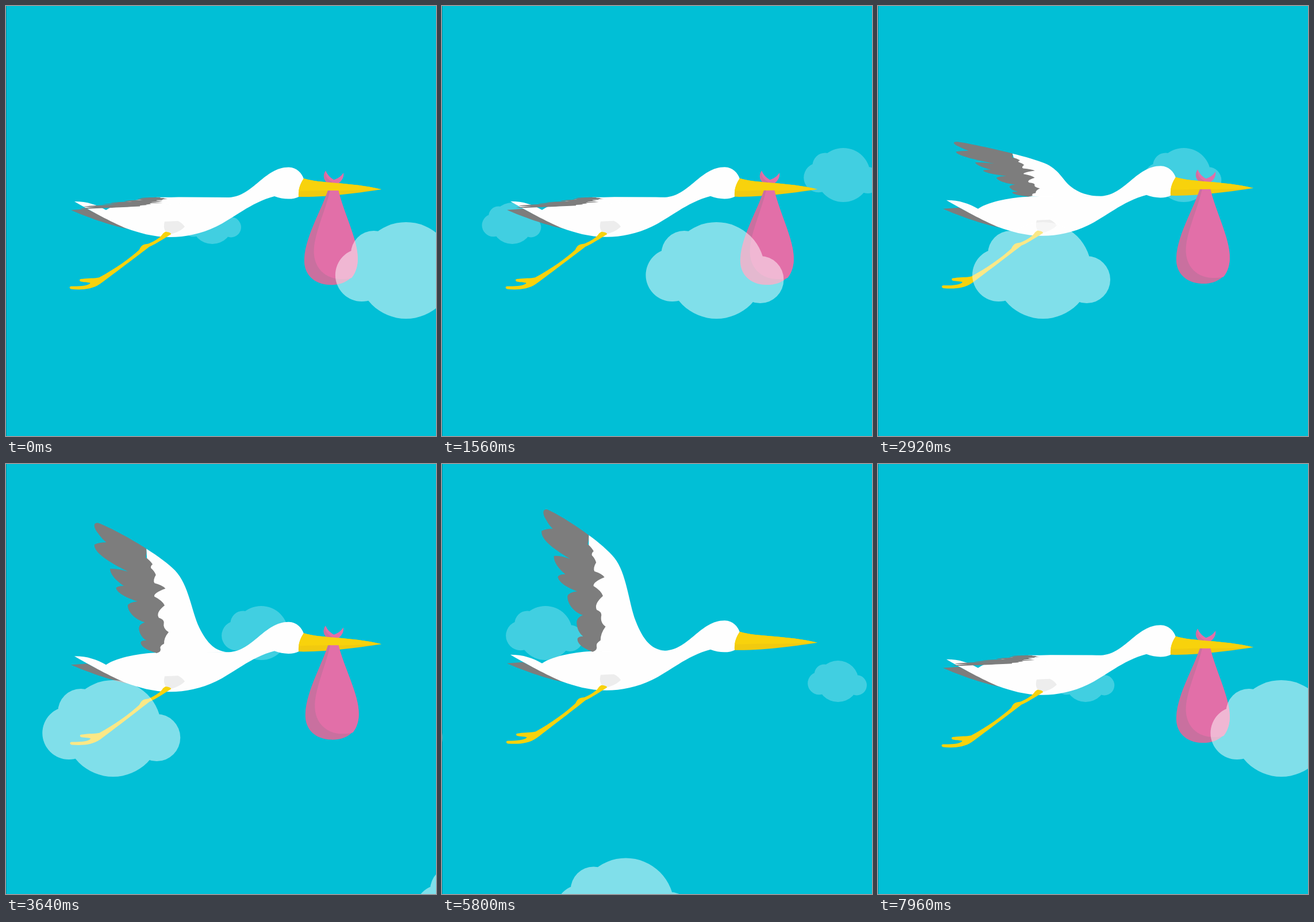
An HTML page with a canvas that plays this animation: 748 px wide and 748 px high, repeating every 8 s.

```html
<!DOCTYPE html>
<html lang="en">
<head>
<meta charset="utf-8">
<title>Stork</title>
<style>
html, body { margin: 0; width: 100%; height: 100%; overflow: hidden; background: #01bfd6; }
canvas { display: block; width: 748px; height: 748px; }
</style>
</head>
<body>
<canvas id="stage" width="748" height="748"></canvas>
<script>
const ctx = document.getElementById('stage').getContext('2d');
const SIZE = 748, MID = 374, LOOP = 8000, FLAP = 800;
const SKY = '#01bfd6', WHITE = '#fefefe', GRAY = '#7d7d7d', YELLOW = '#f8d20c';
const RAD = Math.PI / 180;

const clamp = v => Math.min(1, Math.max(0, v));
const part = (t, from, to) => clamp((t - from) / (to - from));
const smooth = s => s * s * (3 - 2 * s);

// cubic-bezier(.5, 0, .5, 1)
function ease(u) {
  let lo = 0, hi = 1;
  for (let i = 0; i < 24; i++) {
    const s = (lo + hi) / 2;
    if (1.5 * s * (1 - s) + s * s * s < u) lo = s; else hi = s;
  }
  return smooth(lo);
}

const shape = {
  tail: 'M113,346 C122,345 132,345 141,344 L212,379 C180,372 140,358 113,346 Z',
  body: 'M119,331 C142,331 158,337 174,346 C195,332 235,326 262,325 L300,323.5 L388,324 ' +
    'C430,322 450,271 492,271.5 C506,272 515,282 518,292 L509,323 C500,328 482,328 467,322 ' +
    'C425,333 395,361 365,375 C340,387 312,393 286,393 C255,393 230,385 210,378 ' +
    'C190,370 155,352 119,331 Z',
  thigh: 'M276,366 L299,365 Q306,368 311,375 C303,383 294,386 286,388 C279,386 272,381 276,366 Z',
  leg: 'M277,384 C282,384 288,386 287,388 C270,399 256,408 250,410 C235,422 190,457 165,476 ' +
    'C150,487 130,487 115,486 C111,485 111,481 115,481 C130,481 144,480 148,475 ' +
    'C144,473 134,474 130,472 C128,469 130,468 134,468 C145,466 155,467 163,465 ' +
    'C190,450 215,432 232,416 C236,408 238,406 248,405 C260,400 270,393 273,387 Z',
  beak: 'M518,291 C545,300 600,297 653,310 C620,315 560,324 509,323 C508,311 512,300 518,291 Z',
  upperBeak: 'M518,291 C545,300 600,297 653,310 C615,313 565,311 509,313 C510,305 513,298 518,291 Z',
  knot: 'M562,302 C551,296 550,287 555,279 C559,287 564,291 570,294 C576,292 582,288 586,281 ' +
    'C588,290 583,296 576,302 Z',
  knotShade: 'M562,302 C551,296 550,287 555,279 C554,288 558,294 569,299 Z',
  sack: 'M564,298 C556,340 525,390 525,434 C525,462 545,477 571,477 ' +
    'C598,477 618,462 618,432 C618,395 585,345 575,298 Z',
  sackLight: 'M567,298 C560,345 541,385 541,417 C541,450 565,467 590,466 C600,466 606,465 609,463 ' +
    'C617,452 618,440 618,432 C618,395 585,345 575,298 Z'
};
for (const k in shape) shape[k] = new Path2D(shape[k]);

const wingWhite = 'M258,126 C275,138 292,153 301,164 C322,190 325,240 337,272 ' +
  'C350,306 365,323 388,324 L262,326 L256,300 Z';
const wingGray = 'M258,126 C240,112 205,90 188,83 C179,82 181,92 186,100 Q191,110 197,115 ' +
  'Q185,115 178,119 C176,132 195,148 226,166 Q208,160 198,161 C197,172 207,184 217,192 ' +
  'Q207,192 204,196 C205,206 222,216 237,221 Q223,223 220,229 C219,243 232,258 246,262 ' +
  'Q236,266 235,274 C235,285 239,294 246,299 Q238,299 236,303 C235,313 248,321 262,326 ' +
  'Q271,323 269,316 Q268,311 276,306 Q276,294 285,282 Q275,275 278,262 Q278,256 270,253 ' +
  'Q265,243 281,229 Q278,220 265,212 Q264,205 284,197 Q280,191 267,187 Q264,182 270,172 ' +
  'Q268,165 263,160 Q262,156 266,153 Q263,147 256,141 Q258,134 258,126 Z';

// The wing is a flat sheet hinged on a horizontal line and seen in perspective.
const HINGE = 324, FOCUS = 1039, REST = 3.4 * RAD, SWING = 96 * RAD;

function wingPath(d, angle, bob) {
  const s0 = Math.sin(REST), c0 = Math.cos(REST);
  const s = Math.sin(angle), c = Math.cos(angle);
  const base = HINGE - MID;
  return new Path2D(d.replace(/([\d.]+),([\d.]+)/g, (m, px, py) => {
    const y = py - MID;
    const h = FOCUS * (y - base) / (y * s0 - FOCUS * c0);
    const x = (px - MID) * (FOCUS - h * s0) / FOCUS;
    const k = FOCUS / (FOCUS - h * s);
    return (MID + x * k).toFixed(2) + ',' + (MID + (base + bob - h * c) * k).toFixed(2);
  }));
}

function fill(path, color) {
  ctx.fillStyle = color;
  ctx.fill(path);
}

// Runs draw with a shift and a turn about (px, py).
function posed(dx, dy, turn, px, py, draw) {
  ctx.save();
  ctx.translate(px + dx, py + dy);
  ctx.rotate(turn);
  ctx.translate(-px, -py);
  draw();
  ctx.restore();
}

const puffs = [[0, 0, 84], [-77, 8, 46], [-56, -29, 40], [76, 16, 41]];

function cloud(x, y, scale, alpha) {
  if (x < -130 || x > SIZE + 130) return;
  ctx.beginPath();
  for (const [dx, dy, r] of puffs) {
    const cx = x + dx * scale, cy = y + dy * scale;
    ctx.moveTo(cx + r * scale, cy);
    ctx.arc(cx, cy, r * scale, 0, Math.PI * 2);
  }
  ctx.fillStyle = `rgba(255,255,255,${alpha})`;
  ctx.fill();
}

function bundle(t, p, bob) {
  let dx = 0, dy = bob - 0.7;
  let turn = 2.7 * smooth(part(p, 0.05, 0.6));
  if (t > 4000 && t < 6200) {
    const u = part(t, 4000, 4700);
    if (u === 1) return;
    dy += 490 * u * u;
    turn -= 8 * u * u;
  } else if (t >= 6200 && t < 7090) {
    const u = part(t, 6200, 7090);
    dx = 55 * (1 - u);
    dy -= 490 * (1 - ease(u));
    turn += 36 * (1 - u);
  }
  posed(dx, dy, turn * RAD, 570, 303, () => {
    fill(shape.knot, '#e26fa8');
    fill(shape.knotShade, '#cf6fa0');
    fill(shape.sack, '#c9709f');
    fill(shape.sackLight, '#e26fa8');
  });
}

function bird(t) {
  const beat = Math.floor(t / FLAP);
  const e = ease(t / FLAP - beat);
  const p = beat % 2 ? e : 1 - e;
  const bob = 9.2 * p - 0.3;
  const lifted = draw => posed(0, bob, 0, 0, 0, draw);

  lifted(() => {
    fill(shape.tail, GRAY);
    fill(shape.body, WHITE);
    fill(shape.thigh, '#ededed');
    fill(shape.beak, '#f1ca0f');
  });
  posed(0, bob, 0.014 * p, 280, 388, () => fill(shape.leg, YELLOW));
  const angle = SWING * p;
  fill(wingPath(wingWhite, angle, bob), WHITE);
  fill(wingPath(wingGray, angle, bob), GRAY);
  bundle(t, p, bob);
  lifted(() => fill(shape.upperBeak, YELLOW));
}

function render(t) {
  ctx.fillStyle = SKY;
  ctx.fillRect(0, 0, SIZE, SIZE);

  cloud(t < 4000 ? 359 - 0.1517 * t : 689 - 0.1517 * (t - 5800), 378, 36 / 84, 0.25);
  cloud(620 - 0.1222 * (t - 2200), 294, 47 / 84, 0.25);
  bird(t);
  const x = 696 - 0.14 * t;
  cloud(x, 460, 1, 0.5);
  cloud(x + 1120, 460, 1, 0.5);
  cloud(320 - 0.238 * (t - 5800), 769.5, 1, 0.5);

  ctx.fillStyle = 'rgba(0,0,0,0.25)';
  ctx.fillRect(0, 0, 1, SIZE);
}

const start = performance.now();
function tick() {
  render((performance.now() - start) % LOOP);
  requestAnimationFrame(tick);
}
tick();
</script>
</body>
</html>
```
